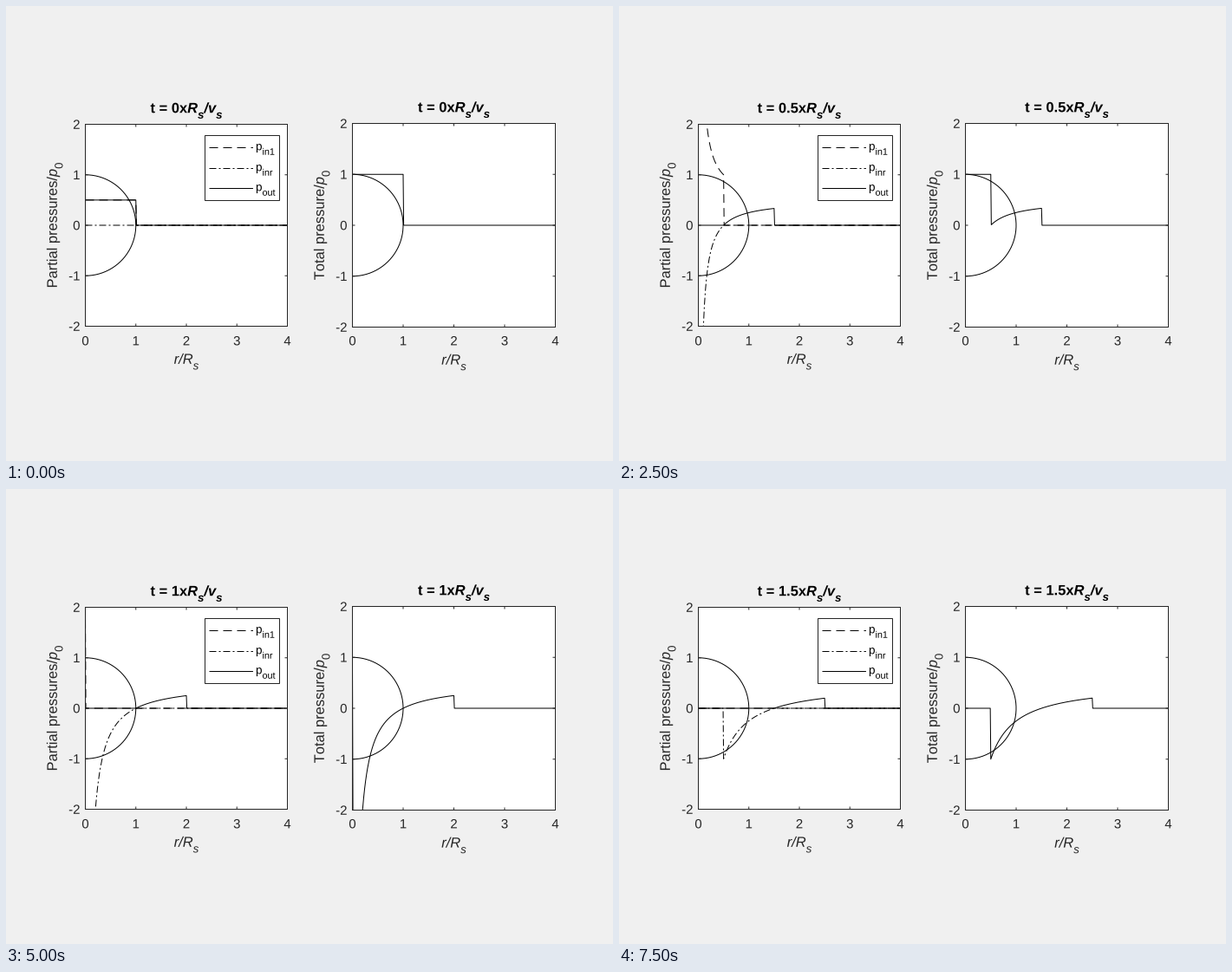
Animation of 700x525 px, one loop 8000 ms. Source, as a matplotlib script:

```python
import numpy as np
import matplotlib.pyplot as plt
from matplotlib.animation import FuncAnimation
from matplotlib.patches import PathPatch, Rectangle
from matplotlib.path import Path
from matplotlib.textpath import TextPath

W, H, DPI = 700, 525, 100
PT = 72 / DPI  # points per pixel
INK = "#262626"
DASH = (0, (10 * PT, 6 * PT))
DASHDOT = (0, (8 * PT, 3 * PT, 2 * PT, 3 * PT))

plt.rcParams.update({
    "lines.linewidth": PT,
    "lines.scale_dashes": False,
    "lines.solid_capstyle": "butt",
})

fig = plt.figure(figsize=(W / DPI, H / DPI), dpi=DPI, facecolor="#f0f0f0")
ax = fig.add_axes([0, 0, 1, 1])
ax.set(xlim=(0, W), ylim=(H, 0))
ax.axis("off")


def glyph(s, style, size):
    prop = dict(family="Liberation Sans",
                weight="bold" if "b" in style else "normal",
                style="italic" if "i" in style else "normal")
    return TextPath((0, 0), s, size=size, prop=prop)


def advance(c, style, size):
    end = [glyph(s, style, size).get_extents().x1 for s in (c + "|", "|")]
    return end[0] - end[1]


def rich(x, y, runs, px, align=0.5, color=INK, vertical=False):
    """Set (text, style) runs on a baseline; style 's' is a subscript."""
    verts, codes, pos = [], [], 0
    for text, style in runs:
        sub = "s" in style
        size, drop = (0.8 * px, 0.4 * px) if sub else (px, 0)
        for c in text:
            if c != " ":
                path = glyph(c, style, size)
                verts.append(path.vertices + [pos, -drop])
                codes.append(path.codes)
            pos += advance(c, style, size)
    u, v = np.concatenate(verts).T
    u = u - align * pos
    pts = (x - v, y - u) if vertical else (x + u, y - v)
    path = Path(np.column_stack(pts), np.concatenate(codes))
    return ax.add_patch(PathPatch(path, fc=color, lw=0, snap=False, zorder=6))


def line(x, y, color=INK, ls="-", zorder=3):
    return ax.plot(x, y, color=color, ls=ls, zorder=zorder, snap=False)[0]


def frame(x0, y0, x1, y1, zorder):
    box = (x0, y0), x1 - x0, y1 - y0
    ax.add_patch(Rectangle(*box, fc="white", lw=0, zorder=zorder - 3))
    ax.add_patch(Rectangle(*box, fc="none", ec=INK, lw=PT, zorder=zorder,
                           snap=False))
    return Rectangle(*box, transform=ax.transData)


class Panel:
    def __init__(self, x0, x1, y0, y1, name, label_x, title_y, xlabel_y):
        self.x0, self.y0 = x0, (y0 + y1) / 2
        self.sx, self.sy = (x1 - x0) / 4, (y1 - y0) / 4
        self.mid, self.title_y, self.title = (x0 + x1) / 2, title_y, None
        self.clip = frame(x0, y0, x1, y1, 3)

        for v in range(5):
            x, y = x0 + v * self.sx, y0 + v * self.sy
            for edge, d in ((y0, 3), (y1, -3)):
                line([x, x], [edge, edge + d])
            for edge, d in ((x0, 3), (x1, -3)):
                line([edge, edge + d], [y, y])
            rich(x, 391.4, [(str(v), "")], 15)
            rich(x0 - 6, y + 5.3, [(str(2 - v), "")], 15, align=1)

        rich(self.mid, xlabel_y, [("r/R", "i"), ("s", "is")], 16.5)
        rich(label_x, self.y0, [(name + "/", ""), ("p", "i"), ("0", "s")],
             16.5, vertical=True)
        a = np.linspace(-np.pi / 2, np.pi / 2, 181)
        self.set(self.curve(), np.cos(a), np.sin(a))

    def curve(self, ls="-"):
        ln = line([], [], "black", ls, 2)
        ln.set_clip_path(self.clip)
        return ln

    def set(self, ln, x, y):
        y = np.clip(y, -2.03, 2.03)
        ln.set_data(self.x0 + x * self.sx, self.y0 - y * self.sy)

    def set_title(self, t):
        if self.title:
            self.title.remove()
        runs = [(f"t = {t:g}x", "b"), ("R", "bi"), ("s", "bis"),
                ("/v", "bi"), ("s", "bis")]
        self.title = rich(self.mid, self.title_y, runs, 16.5, color="black")


left = Panel(91.5, 324.5, 136.5, 369.5, "Partial pressures", 58.8, 123.2, 412.8)
right = Panel(399.5, 633.5, 135.5, 370.5, "Total pressure", 366.8, 122.3, 413.6)
parts = [left.curve(ls) for ls in (DASH, DASHDOT, "-")]
total = right.curve()

frame(229.5, 149.5, 315.5, 224.5, 7 - 1)
for y, sub, ls in ((163.5, "in1", DASH), (187.5, "inr", DASHDOT), (210.5, "out", "-")):
    line([234.5, 285], [y, y], "black", ls, 5)
    rich(288, y + 2.8, [("p", ""), (sub, "s")], 13.5, align=0, color="black")

r = np.linspace(0, 4, 401)
EPS = 1e-6


def waves(t):
    """Ingoing, reflected and outgoing pressure of a unit sphere at time t."""
    ratio = t / np.maximum(r, 1e-9)
    ahead, behind = 0.5 * (1 + ratio), 0.5 * (1 - ratio)
    inward = np.where(r < 1 - t + EPS, ahead, 0)
    reflected = np.where((r > t - 1 - EPS) & (r < t - EPS), behind, 0)
    outward = np.where((r > t - EPS) & (r < 1 + t + EPS), behind, 0)
    return inward, reflected, outward


def draw(k):
    t = k / 10
    p = waves(t)
    for ln, y in zip(parts, p):
        left.set(ln, r, y)
    right.set(total, r, sum(p))
    for panel in (left, right):
        panel.set_title(t)


anim = FuncAnimation(fig, draw, frames=16, interval=500, repeat=True)
plt.show()
```
